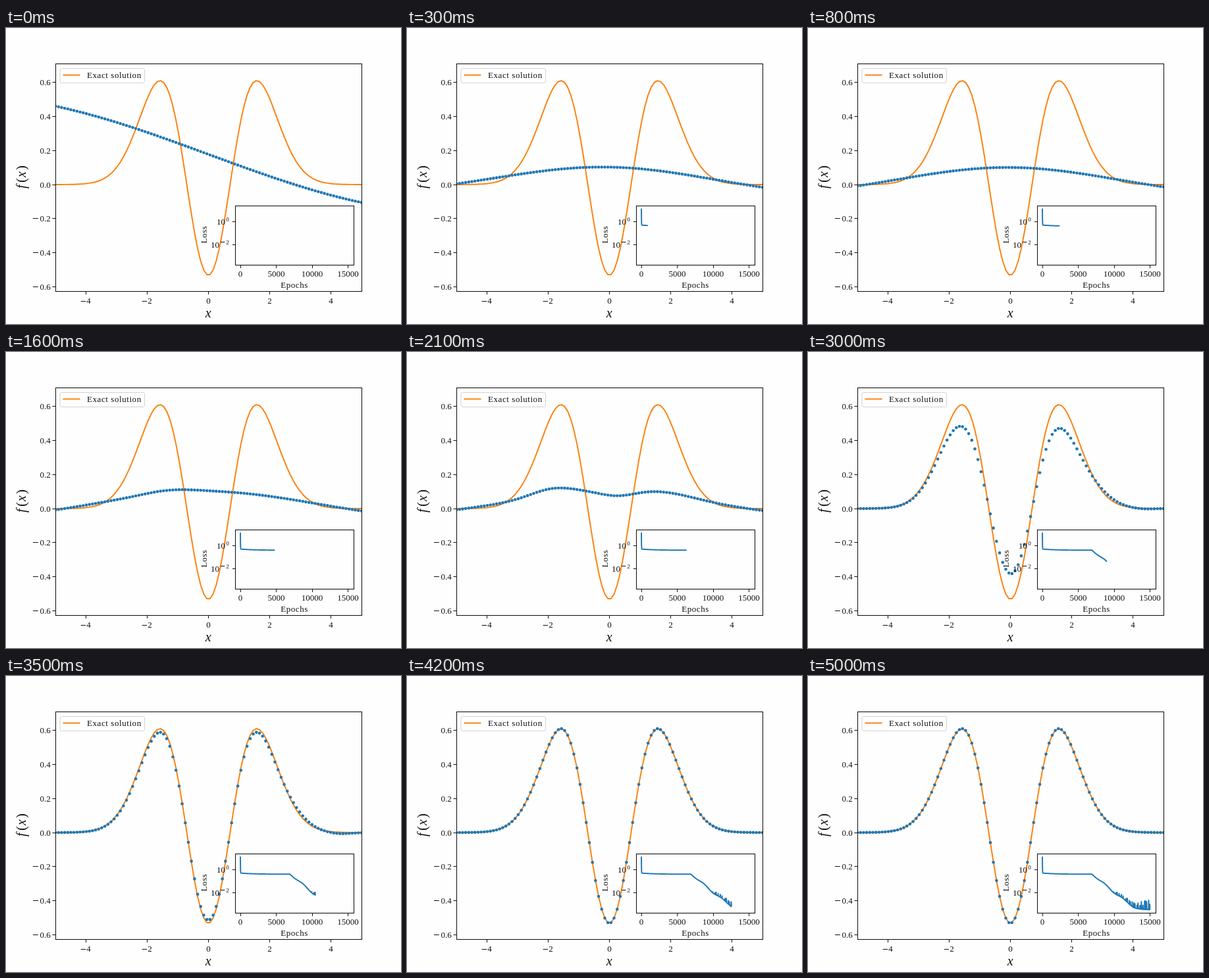
An HTML page that plays this animation: 600 by 450 pixels, repeating every 5100 ms.

```html
<!DOCTYPE html>
<html lang="en">
<head>
<meta charset="utf-8">
<title>Training progress</title>
<style>
  html, body { margin: 0; width: 100%; height: 100%; overflow: hidden; background: #fefefe; }
  svg { display: block; width: 600px; height: 450px; }
  text { font-family: "Liberation Serif", serif; font-size: 13px; fill: #111; }
  .word { letter-spacing: .57px; }
  .math { font-size: 20px; font-style: italic; }
  .paren { font-size: 21px; }
  .exp { font-size: 9.2px; }
  .axis { fill: none; stroke: #111; stroke-width: 1.05; }
  .exact, .loss { fill: none; stroke-width: 1.95; stroke-linejoin: round; }
  .exact { stroke: #fc800e; }
  .loss { stroke: #1f77b4; }
  .dot { fill: #1f77b4; }
</style>
</head>
<body>
<svg id="stage" viewBox="0 0 600 450"></svg>
<script>
const STEP = 100, STEPS = 51, EPOCHS_PER_STEP = 300, COUNT = 100;
const stage = document.getElementById('stage');

function add(parent, tag, attrs, text) {
  const el = document.createElementNS('http://www.w3.org/2000/svg', tag);
  for (const key in attrs) el.setAttribute(key, attrs[key]);
  if (text !== undefined) el.textContent = text;
  parent.appendChild(el);
  return el;
}
const label = (x, y, text, anchor = 'middle', cls = '', parent = stage) =>
  add(parent, 'text', { x, y, 'text-anchor': anchor, class: cls }, text);
const line = (d, cls = 'axis', parent = stage) => add(parent, 'path', { d, class: cls });
const toPath = pts => 'M' + pts.map(p => p[0].toFixed(2) + ' ' + p[1].toFixed(2)).join('L');
const lerp = (a, b, u) => a + (b - a) * u;
const clamp = u => Math.min(1, Math.max(0, u));
const snap = v => Math.floor(v) + .5;

// Scales of the main plot and the inset
const px = x => 307.5 + 46.5 * x;
const py = v => 238 - 259.5 * v;
const ex = e => 356 + .0109 * e;
const xs = Array.from({ length: COUNT }, (_, i) => -5 + 10 * i / (COUNT - 1));

// Stages of the fit
const bump = (x, c, w) => Math.exp(-(((x - c) / w) ** 2));
const exact = x => (2 * x * x - 1) * Math.exp(-x * x / 2) / (Math.SQRT2 * Math.PI ** .25);
const start = x => .177 - .347 * Math.sin(.19 * x);
const hump = x => .18 * bump(x, -.1, 5.1) - .08;
const lean = x => hump(x) + .017 * bump(x, -1.3, 1.1);
const waves = x => .292 * bump(x, -1.94, .96) + .235 * bump(x, 1.75, 1.42) - .19 * bump(x, .31, .77);
const near = x => .965 * exact(x) + .02 * bump(x, 2.9, .6) - .008 * bump(x, 4.3, .5);

// Positive rates ease in, negative rates ease out
const ease = (u, rate) => rate ? Math.expm1(rate * u) / Math.expm1(rate) : u;
const phases = [
  { from: 8, to: 16, a: hump, b: lean, rate: 0 },
  { from: 16, to: 25, a: lean, b: waves, rate: 4.5 },
  { from: 25, to: 35, a: waves, b: near, rate: -1.5 },
  { from: 35, to: 42, a: near, b: exact, rate: -2 }
];

function fitAt(k) {
  const { from, to, a, b, rate } = phases.find(p => k < p.to) || phases.at(-1);
  const u = ease(clamp((k - from) / (to - from)), rate);
  const settle = Math.exp(-1.2 * k);
  return x => lerp(lerp(a(x), b(x), u), start(x), settle);
}

// Loss: first drop, plateau, wavy fall, settling, with ever taller random spikes
function lossBase(e) {
  const u = clamp((e - 6900) / 5800);
  return 299.6 - 25 * Math.exp(-e / 15) + 1.8 * (1 - Math.exp(-e / 2000))
    + 50.5 * u - 1.7 * Math.sin(Math.PI * u) * Math.cos((e - 8600) / 446)
    + 3.8 * (1 - Math.exp(-Math.max(0, e - 12700) / 900));
}

let seed = 11;
const random = () => (seed = seed * 16807 % 2147483647) / 2147483647;
const lossPts = [];
let spike = 0, next = 9950;
for (let e = 0; e <= 15000; e += 10) {
  spike *= .67;
  if (e >= next) {
    spike = (e - 8500) / 430 * (.45 + .55 * random());
    next = e + lerp(90, 330, random()) * (e < 11500 ? 1.5 : 1);
  }
  lossPts.push([ex(e), lossBase(e) - spike]);
}

// Main axes
const clip = add(add(stage, 'defs', {}), 'clipPath', { id: 'area' });
add(clip, 'rect', { x: 75, y: 54, width: 465, height: 346.5 });
const plot = add(stage, 'g', { 'clip-path': 'url(#area)' });
line(toPath(xs.map(x => [px(x), py(exact(x))])), 'exact', plot);
const dots = xs.map(x => add(plot, 'circle', { cx: px(x).toFixed(2), r: 2.3, class: 'dot' }));

add(stage, 'rect', { x: 75.5, y: 54.5, width: 465, height: 346, class: 'axis' });
for (let v = -4; v <= 4; v += 2) {
  const x = snap(px(v));
  line(`M${x} 400.5v4.6`);
  label(v < 0 ? x + 4 : x, 419.3, Math.abs(v));
  if (v < 0) line(`M${x - 7.8} 415.5h7.4`);
}
for (let n = -3; n <= 3; n++) {
  const y = snap(py(n / 5));
  line(`M75 ${y}h-4.6`);
  label(67.8, y + 4, Math.abs(n / 5).toFixed(1), 'end');
  if (n < 0) line(`M41 ${y}h7.8`);
}
label(307.3, 440, 'x', 'middle', 'math');
const yName = add(stage, 'g', { transform: 'translate(29.5 246) rotate(-90)' });
label(2, 0, 'f', 'start', 'math', yName);
label(11, 0, '(', 'start', 'paren', yName);
label(19, 0, 'x', 'start', 'math', yName);
label(30, 0, ')', 'start', 'paren', yName);

// Legend
add(stage, 'rect', { x: 82, y: 61.5, width: 128.5, height: 22, rx: 2.6, fill: '#fefefe', stroke: '#d2d2d2' });
line('M86.5 71.5h26', 'exact');
label(123, 75.8, 'Exact solution', 'start', 'word');

// Inset
const frame = { x: 348.5, y: 270.5, width: 180, height: 90 };
add(stage, 'rect', { ...frame, fill: '#fefefe' });
const loss = line('', 'loss');
add(stage, 'rect', { ...frame, class: 'axis' });
for (let e = 0; e <= 15000; e += 5000) {
  line(`M${snap(ex(e))} 360.5v4.6`);
  label(ex(e), 378, e);
}
label(438, 395, 'Epochs', 'middle', 'word');
label(0, 0, 'Loss', 'middle', 'word').setAttribute('transform', 'translate(305.3 314) rotate(-90)');
line('M348.5 294.5h-4.6M348.5 329.5h-4.6M326 325.5h6.4');
label(320, 299, '10', 'start');
label(334.3, 294.3, '0', 'start', 'exp');
label(311, 333.5, '10', 'start');
label(334.3, 328.8, '2', 'start', 'exp');

let shown = -1;
function draw(now) {
  const k = Math.floor(now / STEP) % STEPS;
  if (k === shown) return;
  shown = k;
  const fit = fitAt(k);
  dots.forEach((dot, i) => dot.setAttribute('cy', py(fit(xs[i])).toFixed(2)));
  loss.setAttribute('d', k ? toPath(lossPts.slice(0, k * EPOCHS_PER_STEP / 10 + 1)) : '');
}
const origin = performance.now();
function tick() {
  draw(performance.now() - origin);
  requestAnimationFrame(tick);
}
tick();
</script>
</body>
</html>
```
